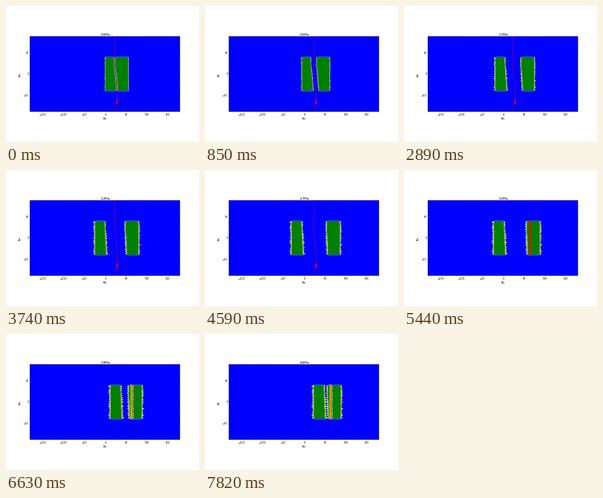
Animation of 242x170 px, one loop 7990 ms. Source, as a matplotlib script:

```python
import numpy as np
import matplotlib.pyplot as plt
from matplotlib.animation import FuncAnimation

W, H, DPI = 242, 170, 100
FRAMES, STEP = 47, 170
PX = 72 / DPI               # points per pixel
KM = 0.5225                 # pixels per kilometre
DRIFT, RETURN = 1.15, 5.0   # km per frame
OPEN_END, CLOSE_START, LEFT_STOP = 29, 30, 22.0

rng = np.random.default_rng(7)
rows = np.linspace(40.3, -40.3, 31)
teeth = np.where(np.arange(rows.size) % 2, 1.0, -0.4)


def zigzag():
    return teeth * rng.uniform(0.3, 1, rows.size)


# outer and inner roughness of the four block margins
rough = [(zigzag(), zigzag()) for _ in range(4)]
trench_rough = zigzag()


def ridge_x(y):
    return np.interp(y, [-90, -65, -40, -5, 20, 90], [23, 29, 29, 26, 23, 23])


def offsets(n):
    right = DRIFT * min(n, OPEN_END)
    left = -right + RETURN * max(0, n - CLOSE_START)
    return min(left, LEFT_STOP), right


def outline(x0, x1):
    xs = np.concatenate([x0, x1[::-1]])
    ys = np.concatenate([rows, rows[::-1]])
    return np.column_stack([xs, ys])


def block(west, east, k, amp):
    """Outer (stretched margin) and inner (crust) outlines of one block."""
    (west_out, west_in), (east_out, east_in) = rough[k], rough[k + 1]
    outer = outline(west - amp * west_out, east + amp * east_out)
    inner = outline(west + amp * (0.35 - 0.45 * west_in),
                    east - amp * (0.35 - 0.45 * east_in))
    return outer, inner


plt.rcParams["font.family"] = "DejaVu Sans"
fig = plt.figure(figsize=(W / DPI, H / DPI), dpi=DPI, facecolor="white")
ax = fig.add_axes([30.2 / W, 0.5 - 90 * KM / H, 360 * KM / W, 180 * KM / H])
ax.set_facecolor("blue")
ax.set(xlim=(-180, 180), ylim=(-90, 90))
ax.set_xticks(range(-150, 151, 50))
ax.set_yticks([-50, 0, 50])
ax.tick_params(length=0.6, width=0.15, pad=1.2, labelsize=3.1 * PX,
               direction="in", top=True, right=True)
for spine in ax.spines.values():
    spine.set_linewidth(0.3)
fig.text(124.3 / W, 1 - 141 / H, "Km", fontsize=3.1 * PX,
         ha="center", va="center")
fig.text(18 / W, 0.5, "Km", fontsize=3.1 * PX, rotation=90,
         ha="center", va="center")
title = fig.text(124.5 / W, 1 - 37.3 / H, "", fontsize=4.0 * PX,
                 ha="center", va="baseline")

ys = np.linspace(90, -90, 60)
ridge, = ax.plot(ridge_x(ys), ys, color="red", lw=0.4, alpha=0.6)
mark, = ax.plot([28, 29, 29], [-71, -68, -62], color="red", lw=1.1)


def add_block():
    margin, = ax.fill([0], [0], fc="yellow", ec="white", lw=0.2)
    crust, = ax.fill([0], [0], fc="green", lw=0)
    return margin, crust


right_block = add_block()
left_block = add_block()

trench_x = 64.5 + 2.4 * trench_rough
trench_edge, = ax.plot(trench_x - 2.2, rows, color="yellow", lw=0.7)
trench_glow, = ax.plot(trench_x + 1.4, rows, color="white", lw=0.6)
trench, = ax.plot(trench_x, rows, color="red")


def draw(n):
    left, right = offsets(n)
    spread = min(n, OPEN_END) / OPEN_END
    amp = 1.2 + 3.2 * spread
    # facing margins straighten and stretch while the gap opens
    split = 26 + (ridge_x(rows) - 26) * (1 - 0.5 * spread)
    gap = 1.6 - 4 * spread
    shapes = (block(np.full(rows.size, left), split - gap + left, 0, amp),
              block(split + gap + right, np.full(rows.size, 56 + right), 2, amp))
    for patches, pair in zip((left_block, right_block), shapes):
        for patch, xy in zip(patches, pair):
            patch.set_xy(xy)

    opening = n < OPEN_END
    ridge.set_visible(opening)
    mark.set_visible(opening)
    closing = n >= 36
    trench.set_linewidth(0.5 if closing else 1.1)
    trench.set_visible(not opening)
    trench_edge.set_visible(closing)
    trench_glow.set_visible(closing)
    title.set_text(f"{n / 10:.1f}Ma")
    return ()


anim = FuncAnimation(fig, draw, frames=FRAMES, interval=STEP,
                     repeat=True, repeat_delay=0, blit=False)
plt.show()
```
